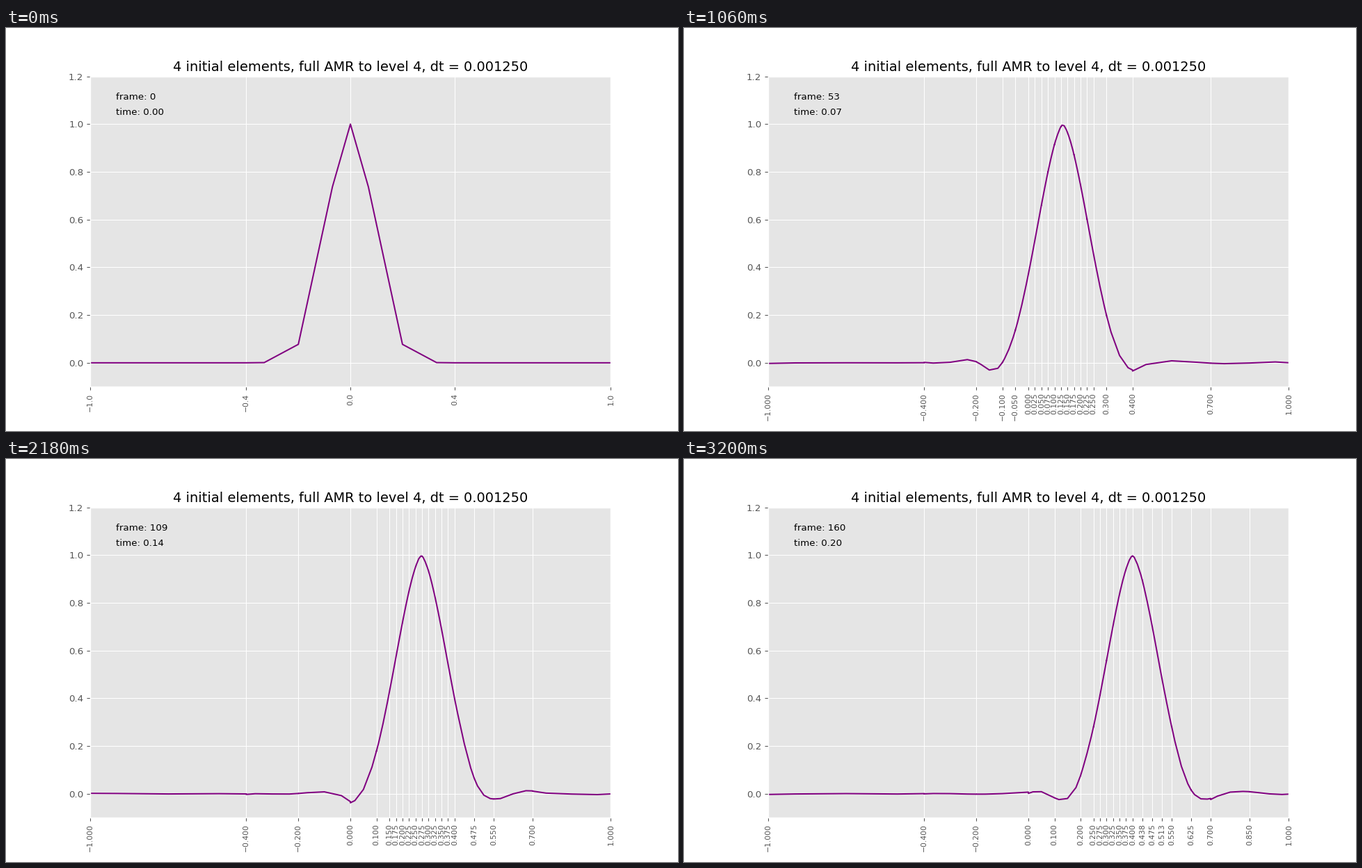
A matplotlib script for the animation above (3220 ms loop, 966 px wide and 580 px high).

```python
import matplotlib.pyplot as plt
import numpy as np
from matplotlib.animation import FuncAnimation
from numpy.polynomial import legendre as leg

# Advection of a Gaussian pulse: discontinuous Galerkin on an adaptive 1D mesh
ORDER = 4
SPEED = 2.0
DT = 0.00125
STEPS = 160
MAX_LEVEL = 4
HOT = 0.51
EPS = 1e-9

# Legendre-Gauss-Lobatto nodes and operators on [-1, 1]
R = np.sqrt(3 / 7)
XI = np.array([-1, -R, 0, R, 1])
V = leg.legvander(XI, ORDER)
V_INV = np.linalg.inv(V)
DIFF = leg.legval(XI, leg.legder(np.eye(ORDER + 1))).T @ V_INV
GAUSS, WEIGHTS = leg.leggauss(ORDER + 1)
NORM = np.arange(ORDER + 1) + 0.5
LIFT = V @ (NORM * (-1.0) ** np.arange(ORDER + 1))  # exact mass matrix


def nodes(mesh):
    return np.array([(a + b) / 2 + (b - a) / 2 * XI for a, b, *_ in mesh])


def halves(cell):
    a, b, level, k = cell
    mid = (a + b) / 2
    return [(a, mid, level + 1, 2 * k), (mid, b, level + 1, 2 * k + 1)]


def siblings(left, right):
    return (left[2] == right[2] > 0 and left[3] % 2 == 0
            and right[3] == left[3] + 1)


def mark(mesh, q):
    """Split hot cells and merge cool sibling pairs, one level at a time."""
    hot = q.max(axis=1) > HOT
    result, i = [], 0
    while i < len(mesh):
        cell = mesh[i]
        if hot[i]:
            result += halves(cell) if cell[2] < MAX_LEVEL else [cell]
        elif (i + 1 < len(mesh) and not hot[i + 1]
              and siblings(cell, mesh[i + 1])):
            result.append((cell[0], mesh[i + 1][1], cell[2] - 1, cell[3] // 2))
            i += 1
        else:
            result.append(cell)
        i += 1
    return result


def balance(mesh):
    """Split cells until neighbours differ by one level at most."""
    mesh, i = list(mesh), 0
    while i < len(mesh) - 1:
        left, right = mesh[i][2], mesh[i + 1][2]
        if abs(left - right) > 1:
            j = i if left < right else i + 1
            mesh[j:j + 1] = halves(mesh[j])
            i = 0
        else:
            i += 1
    return mesh


def project(mesh, q, new_mesh):
    """L2 projection from one mesh to another."""
    result = []
    for a, b, *_ in new_mesh:
        coef = np.zeros(ORDER + 1)
        for (c, d, *_), values in zip(mesh, q):
            lo, hi = max(a, c), min(b, d)
            if hi - lo < EPS:
                continue
            x = (lo + hi) / 2 + (hi - lo) / 2 * GAUSS
            f = leg.legval(2 * (x - c) / (d - c) - 1, V_INV @ values)
            basis = leg.legvander(2 * (x - a) / (b - a) - 1, ORDER)
            coef += (hi - lo) / (b - a) * NORM * ((WEIGHTS * f) @ basis)
        result.append(V @ coef)
    return np.array(result)


def rate(q, scale):
    """Upwind semi-discrete right-hand side, periodic ends."""
    jump = q[:, 0] - np.roll(q[:, -1], 1)
    return -scale * (q @ DIFF.T + np.outer(jump, LIFT))


def advance(mesh, q, substeps=2):
    scale = np.array([[2 * SPEED / (b - a)] for a, b, *_ in mesh])
    for _ in range(substeps):
        term = q
        for k in range(1, 5):
            term = rate(term, scale) * DT / substeps / k
            q = q + term
    return q


def simulate():
    ends = [-1.0, -0.4, 0.0, 0.4, 1.0]
    mesh = [(a, b, 0, 0) for a, b in zip(ends, ends[1:])]
    q = np.exp(-64 * nodes(mesh) ** 2)
    states = [(mesh, q)]
    for _ in range(STEPS):
        for adapted in (mark(mesh, q), None):
            adapted = adapted or balance(mesh)
            if adapted != mesh:
                mesh, q = adapted, project(mesh, q, adapted)
        q = advance(mesh, q)
        states.append((mesh, q))
    return states


states = simulate()

plt.style.use("ggplot")
plt.rcParams["font.family"] = "DejaVu Sans"
fig = plt.figure(figsize=(10, 6.0042), dpi=96.6, facecolor="white")
ax = fig.add_axes([0.125, 0.11, 0.775, 0.77])
ax.set_title(f"4 initial elements, full AMR to level 4, dt = {DT:.6f}",
             fontsize=14.43)
ax.set_xlim(-1, 1)
ax.set_ylim(-0.1, 1.2)
ax.set_yticks(np.arange(7) / 5)
ax.tick_params(axis="x", labelrotation=90, labelsize=8)
line, = ax.plot([], [], color="purple", linewidth=1.5)
frame_text = ax.text(0.05, 0.925, "", transform=ax.transAxes)
time_text = ax.text(0.05, 0.875, "", transform=ax.transAxes)


def update(i):
    mesh, q = states[i]
    edges = np.array([c[0] for c in mesh] + [1.0])
    ax.set_xticks(np.minimum(edges + EPS, 1))  # nudge so ties round up
    line.set_data(nodes(mesh).ravel(), q.ravel())
    frame_text.set_text(f"frame: {i}")
    time_text.set_text(f"time: {i * DT:.2f}")
    return line, frame_text, time_text


anim = FuncAnimation(fig, update, frames=STEPS + 1, interval=20,
                     repeat=True, repeat_delay=0, blit=False)
plt.show()
```
